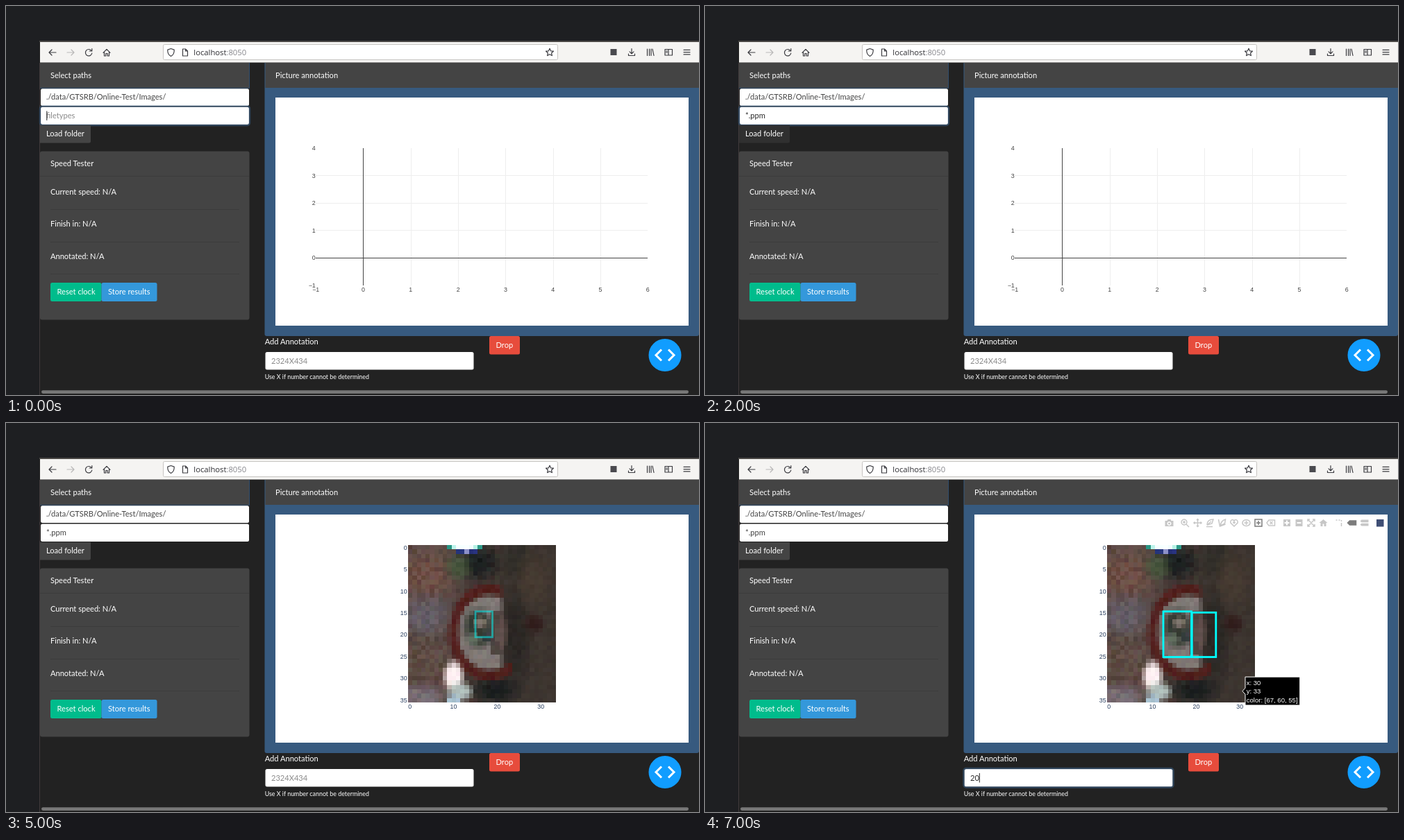
Recreate the animation shown at these times as an HTML page with a canvas. Size 998 by 561 pixels, loop 8 s.

```html
<!DOCTYPE html>
<html lang="en">
<head>
<meta charset="utf-8">
<title>Picture annotation</title>
<style>
  html, body { margin: 0; width: 100%; height: 100%; overflow: hidden; background: #1e1f22; }
  #stage { position: relative; width: 998px; height: 561px; overflow: hidden; }
  svg { position: absolute; left: 0; top: 0; }
  #photo { position: absolute; left: 578.5px; top: 176.3px; width: 213.8px; height: 226.3px; image-rendering: pixelated; }
  text { font: 11.1px Lato, sans-serif; fill: #fff; }
  .url { font: 11.25px "Open Sans", sans-serif; fill: #2b2b30; }
  .dim { fill: #85858a; }
  .field { fill: #444; }
  .typed { fill: #2a2a2a; }
  .hint { fill: #8a8a8a; }
  .small { font-size: 8.9px; }
  .tick { font: 8.9px "Liberation Sans", Arial, sans-serif; fill: #444; }
  .navy { fill: #2a3f5f; }
  .tip { font: 8.8px "Liberation Sans", Arial, sans-serif; }
  .hover { font: 9.57px "Liberation Sans", Arial, sans-serif; }
  .ico { fill: none; stroke: #3c3c41; stroke-width: 1.2; stroke-linecap: round; stroke-linejoin: round; }
  .bar path { fill: none; stroke: #c7c7c7; stroke-width: 1.5; }
  .bar .solid { fill: #c7c7c7; stroke: none; fill-rule: evenodd; }
  .bar .on { stroke: #7c7c7c; }
  .bar .solid.on { fill: #7c7c7c; }
  .mark { fill: none; stroke: #0ff; stroke-width: 2.8; }
  .ring { fill: none; stroke: #375a7f; stroke-opacity: .6; stroke-width: 2.4; }
  .caret { fill: #222; }
  [data-on] { visibility: hidden; }
  [data-on].show { visibility: visible; }
</style>
</head>
<body>
<div id="stage">
<svg width="998" height="561" viewBox="0 0 998 561">
  <rect width="998" height="561" fill="#1e1f22"/>
  <rect x="48" y="50" width="950" height="511" fill="#222"/>
  <rect x="48" y="82" width="1" height="479" fill="#413a3c"/>
  <rect x="48" y="50" width="950" height="2" fill="#4a4845"/>
  <rect x="49" y="52" width="949" height="29.5" fill="#f5f4f2"/>
  <rect x="226.5" y="55.5" width="568" height="22" rx="2" fill="#fff" stroke="#c6c4c1"/>
  <g class="ico">
    <path d="M72 67H62.500M66 63l-4 4 4 4"/>
    <path d="M88 67h9.500M94 63l4 4-4 4" stroke="#b9b8b8"/>
    <path d="M123 64.500a4.700 4.700 0 1 0 .8 3.500M123.800 61.500v3.500h-3.500"/>
    <path d="M140 67.300l5-5 5 5M141.500 66.500v5.500h2.300v-3.500h2.400v3.500h2.300v-5.500"/>
    <path d="M237.500 61.500l4.700 1.600c.3 4.500-1.200 7.500-4.700 9.400-3.500-1.900-5-4.900-4.700-9.400z"/>
    <path d="M254.500 62h4l3 3v7h-7zM258.500 62v3h3"/>
    <path d="M783 61.300l1.600 3.500 3.800.4-2.800 2.600.8 3.800-3.400-1.900-3.400 1.900.8-3.800-2.800-2.600 3.800-.4z"/>
    <path d="M901 61.500v7M898 65.800l3 3 3-3M896.500 69v2.500h9V69"/>
    <path d="M923.500 62v9.500M926.500 62v9.500M929 62v9.500M931 62l2 9.500"/>
    <path d="M949 62.500h10.500v8.500H949zM954 62.500v8.500M950.500 65h2M950.500 67h2"/>
    <path d="M976 63.300h9M976 66.600h9M976 69.900h9"/>
  </g>
  <rect x="870.500" y="62" width="9" height="9" fill="#4a4a4f"/>
  <text class="url" x="270.300" y="70.600">localhost<tspan class="dim">:8050</tspan></text>

  <rect x="49" y="82" width="302" height="36.800" fill="#304e6e"/>
  <rect x="49" y="82" width="301" height="35.800" fill="#444"/>
  <text x="64" y="103.600">Select paths</text>
  <rect x="50" y="119.200" width="300" height="24.800" rx="2.500" fill="#fff"/>
  <text class="field" x="58" y="135.200">./data/GTSRB/Online-Test/Images/</text>
  <rect x="50" y="145.400" width="300" height="25.600" rx="2.500" fill="#fff"/>
  <rect class="ring" data-on="012" x="49" y="144.600" width="302" height="27.400" rx="3.500"/>
  <text class="hint" data-on="0" x="58" y="162.200">filetypes</text>
  <text class="typed" data-on="12" x="58" y="162.200">*.ppm</text>
  <text class="field" data-on="34567" x="58" y="162.200">*.ppm</text>
  <rect class="caret" data-on="0" x="58.300" y="151.500" width="1" height="13.500"/>
  <rect class="caret" data-on="1" x="86" y="151.500" width="1" height="13.500"/>

  <path data-on="01567" d="M49 172h73v23q0 2.500-2.500 2.500H49z" fill="#444"/>
  <path data-on="2" d="M49 172h73v23q0 2.500-2.500 2.500H49z" fill="#303030"/>
  <g data-on="34">
    <path d="M49 170.500h72q2.500 0 2.500 2.500v24q0 2.500-2.500 2.500H49z" fill="#565656"/>
    <path d="M49 172h71q2 0 2 2v21.500q0 2-2 2H49z" fill="#333"/>
  </g>
  <text x="58" y="188.400">Load folder</text>

  <rect x="49" y="209.500" width="301.500" height="243" rx="3" fill="#444"/>
  <path d="M49 245.500h301" stroke="#3b3b3b"/>
  <path d="M64 293.500h272M64 340.500h272M64 386.500h272" stroke="#3c3c3c"/>
  <text x="64" y="231.400">Speed Tester</text>
  <text x="64" y="271.600">Current speed: N/A</text>
  <text x="64" y="318.300">Finish in: N/A</text>
  <text x="64" y="364.500">Annotated: N/A</text>
  <rect x="64" y="399" width="73.500" height="27" rx="2.500" fill="#00bc8c"/>
  <rect x="137.500" y="399" width="80" height="27" rx="2.500" fill="#3498db"/>
  <text x="73.500" y="416.300">Reset clock</text>
  <text x="147" y="416.300">Store results</text>

  <path d="M372.500 82H998v391q0 3-3 3H375.500q-3 0-3-3z" fill="#375a7f"/>
  <rect x="373.500" y="82" width="624.500" height="36" fill="#444"/>
  <text x="388" y="103.600">Picture annotation</text>
  <rect x="388" y="132" width="595" height="329" fill="#fff"/>
  <g id="empty" data-on="012"></g>
  <g id="axes" data-on="34567"></g>

  <text x="372.700" y="488">Add Annotation</text>
  <rect x="373.500" y="499" width="300" height="25.500" rx="2.500" fill="#fff"/>
  <text class="hint" data-on="0123456" x="382" y="515.800">2324X434</text>
  <g data-on="7">
    <rect class="ring" x="372.500" y="498" width="302" height="27.500" rx="3.500"/>
    <text class="typed" x="382" y="515.800">20</text>
    <rect class="caret" x="394.800" y="505" width="1" height="13.500"/>
  </g>
  <text class="small" x="372.700" y="537.500">Use X if number cannot be determined</text>
  <rect x="696" y="476" width="44" height="26.500" rx="2.500" fill="#e74c3c"/>
  <text x="705.500" y="493.300">Drop</text>
  <circle cx="949" cy="503.500" r="23.500" fill="#119dff"/>
  <path d="M944 495.500l-8 8 8 8M954 495.500l8 8-8 8" fill="none" stroke="#fff" stroke-width="3"/>
  <rect x="51" y="554.300" width="932" height="4.600" rx="2.300" fill="#777"/>
</svg>
<canvas id="photo" width="34" height="36" data-on="34567"></canvas>
<svg width="998" height="561" viewBox="0 0 998 561">
  <rect class="mark" data-on="5" x="676" y="271.800" width="24.500" height="37" stroke-opacity=".5"/>
  <rect class="mark" data-on="67" x="660" y="271.800" width="40.500" height="65.700"/>
  <rect class="mark" data-on="6" x="729.300" y="274" width="5.500" height="6.500" stroke-opacity=".55"/>
  <rect class="mark" data-on="7" x="701.300" y="273.300" width="34.500" height="64.200"/>
  <g id="bar" class="bar" data-on="47"></g>
  <g data-on="4">
    <path d="M797 147.500l4.500 5h-9z" fill="#69738a"/>
    <rect x="736.500" y="152" width="73.500" height="20.300" rx="1.500" fill="#69738a"/>
    <text class="tip" x="743.700" y="165.200">Draw rectangle</text>
  </g>
  <g data-on="7">
    <path d="M774 386.700l4-4.500V366.200h78.700v40.800H778v-15.800z" fill="#000" stroke="#fff"/>
    <text class="hover" x="779.700" y="377.700">x: 30</text>
    <text class="hover" x="779.700" y="390.200">y: 33</text>
    <text class="hover" x="779.700" y="402.600">color: [67, 60, 55]</text>
  </g>
</svg>
</div>
<script>
const $ = id => document.getElementById(id);
const range = n => [...Array(n).keys()];
const label = (x, y, s, anchor, cls = '') =>
  `<text class="tick ${cls}" x="${x}" y="${y}" text-anchor="${anchor}">${String(s).replace('-', '\u2212')}</text>`;
const line = (d, color) => `<path d="${d}" stroke="${color}"/>`;

// Empty chart: x from -1 to 6, y from -1 to 4
const px = v => 514.5 + v * 68.3, py = v => 363 - v * 39.5;
$('empty').innerHTML =
  range(5).map(i => line(`M${Math.round(px(i + 1)) + .5} 205V403`, '#eee')).join('') +
  range(3).map(i => line(`M446 ${Math.floor(py(i + 1)) + .5}H924`, '#eee')).join('') +
  line('M514.500 205V403M446 363.500H924', '#444') +
  range(8).map(i => label(px(i - 1), 412, i - 1, 'middle')).join('') +
  range(6).map(i => label(445.8, py(i - 1) + 3.1, i - 1, 'end')).join('');

$('axes').innerHTML =
  range(4).map(i => label(581.6 + i * 62.9, 412, i * 10, 'middle', 'navy')).join('') +
  range(8).map(i => label(577.7, 182.7 + i * 31.43, i * 5, 'end', 'navy')).join('');

// Chart tools: centre x, path around the centre, class
const box = 'M-5-5H5V5H-5Z', plus = 'M-3 0H3M0-3V3';
const tools = [
  [668.5, 'M-6-3H-3L-2-5H2L3-3H6V5H-6ZM0-2A3 3 0 1 0 .01-2ZM0-.5A1.500 1.500 0 1 1-.01-.5Z', 'solid'],
  [691, 'M3-1A4 4 0 1 1 3-1.010M2 2L6 6M-3-1H1M-1-3V1'],
  [709.5, 'M-5 0H5M0-5V5M-1.500-4L0-5.500 1.500-4M-1.500 4L0 5.500 1.500 4M-4-1.500L-5.500 0-4 1.500M4-1.500L5.500 0 4 1.500'],
  [727, 'M-4 3C-4-3 0-5 5-5L3 1-4 3 2-2M-5 5.500H4'],
  [744.5, 'M-5-5L-3 5 5 2M-2 4C-2-2 2-4 5-5L4 1Z'],
  [762, 'M0 5L-5 0C-6-4-2-6 0-3 2-6 6-4 5 0ZM-2-.5H2M0-2.500V1.500'],
  [779.5, 'M5.500 0A5.500 4.500 0 1 1 5.500-.01' + plus],
  [797, box + plus, 'on'],
  [815, 'M-6 0L-3-4H5.500V4H-3ZM-1.500-2L2.500 2M2.500-2L-1.500 2'],
  [838, box + 'M-3.500-1H-1V-3.500H1V-1H3.500V1H1V3.500H-1V1H-3.500Z', 'solid'],
  [855.5, box + 'M-3-1H3V1H-3Z', 'solid'],
  [873, 'M-5-2V-5H-2M2-5H5V-2M5 2V5H2M-2 5H-5V2M-4-4L4 4M4-4L-4 4'],
  [890.5, 'M-6 0L0-5 6 0H4V5H1V1.500H-1V5H-4V0Z', 'solid'],
  [912.5, 'M-4-4H-2M0-4H2M4-4V-2M4 0V5'],
  [931.5, 'M-6 0L-3-3H6V3H-3Z', 'solid on'],
  [949.5, 'M-6-2.500L-4-4.500H6V-.7H-4ZM-6 2.500L-4 .7H6V4.500H-4Z', 'solid']
];
$('bar').innerHTML = tools.map(([x, d, c = '']) =>
  `<path class="${c}" d="${d}" transform="translate(${x} 144)"/>`).join('') +
  '<rect x="967" y="139" width="10.500" height="10.500" fill="#3f4f75"/>';

// Coarse picture: soft blobs [cx, cy, rx, ry, colour], an open ring and grain
const under = [
  [4, 7, 9, 7, '#6b4c43'], [4, 16, 8, 6, '#625b62'], [4, 27, 9, 6, '#5c4a42'], [3, 35, 8, 4, '#756a70'],
  [16, 4, 6, 5, '#1c2020'], [11.5, 5, 3.5, 4, '#46533c'], [20, 33, 7, 4, '#1d2020'],
  [25, 21, 4, 14, '#2b2724'], [29, 18, 3, 3, '#321f1e'], [25, 3, 4, 6, '#302d28'], [29, 8, 5, 8, '#443930']
];
const over = [
  [16, 19, 4, 5.5, '#353a33'], [16.5, 17.7, 1.8, 1.5, '#7b7068'], [15, 21.5, 2, 1.5, '#667062'],
  [18, 21, 1, 2, '#333a3c'], [21.5, 20, 1.4, 5.5, '#62504d'],
  [10.5, 30, 2.7, 4.2, '#fff2f3'], [12, 33.5, 3.3, 2.6, '#b0bdb9'], [10.5, 35.5, 2, 1.5, '#a9c1d3']
];
const rgb = hex => [1, 3, 5].map(i => parseInt(hex.slice(i, i + 2), 16));
const clamp = v => Math.max(0, Math.min(1, v));
const mix = (a, b, k) => a.map((v, i) => v + (b[i] - v) * k);
const blend = (c, blobs, x, y, gain) => blobs.reduce((acc, [cx, cy, rx, ry, hex]) =>
  mix(acc, rgb(hex), clamp((1 - Math.hypot((x - cx) / rx, (y - cy) / ry)) * gain)), c);

let seed = 7;
const rnd = () => (seed = seed * 16807 % 2147483647) / 2147483647 - .5;

function cell(x, y) {
  let c = mix(rgb('#594742'), rgb('#3c342f'), clamp((x - 8) / 12));
  c = blend(c, under, x, y, 1.6);
  const d = Math.hypot((x - 18.7) / 9.2, (y - 20) / 11);
  c = mix(c, rgb('#827a77'), clamp((.85 - d) * 8) * clamp(22 - x) * (x > 19 && y > 15 && y < 25 ? .25 : .95));
  const edge = y < 20 ? 22 : 24.5;
  c = mix(c, rgb('#521f1c'), clamp(1.7 - Math.abs(d - .9) * 11) * clamp(edge - x) * (x > 19 && Math.abs(y - 20) < 7 ? 0 : .95));
  c = blend(c, over, x, y, 2);
  if (y < 1 && x > 9 && x < 17) c = rgb(x < 10 || x > 16 ? '#2a9384' : x < 11 || x > 15 ? '#b9f3e9' : '#f4ffff');
  else if (y < 2 && x > 11 && x < 16) c = rgb(x > 13 && x < 14 ? '#8d8fc4' : '#27347c');
  const grain = x < 9 ? 20 : x < 21 ? 13 : 7, g = rnd() * grain;
  return c.map(v => v + g + rnd() * grain * .5);
}

const ctx = $('photo').getContext('2d');
for (const y of range(36)) for (const x of range(34)) {
  ctx.fillStyle = `rgb(${cell(x + .5, y + .5).map(v => Math.round(clamp(v / 255) * 255))})`;
  ctx.fillRect(x, y, 1, 1);
}

// Eight one-second steps; data-on lists the steps an element is visible in
const parts = [...document.querySelectorAll('[data-on]')];
let shown = -1;
function draw() {
  const step = Math.floor(performance.now() / 1000) % 8;
  if (step !== shown) {
    shown = step;
    for (const p of parts) p.classList.toggle('show', p.dataset.on.includes(step));
  }
  requestAnimationFrame(draw);
}
draw();
</script>
</body>
</html>
```
